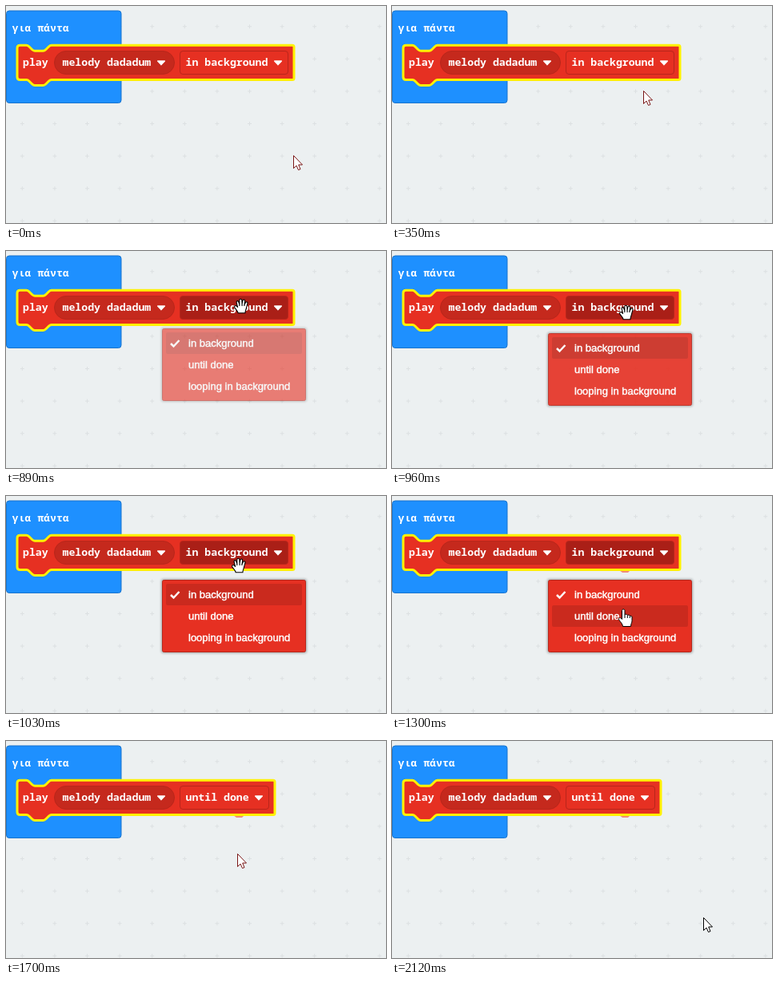
An HTML page that plays this animation: 475 by 272 pixels, repeating every 2390 ms.

```html
<!DOCTYPE html>
<html lang="el">
<head>
<meta charset="utf-8">
<title>Block dropdown</title>
<style>
  html, body { margin: 0; width: 100%; height: 100%; overflow: hidden; background: #ecf0f1; }
  svg { display: block; width: 475px; height: 272px; }
  .code { font: bold 13.2px "Noto Sans Mono", "DejaVu Sans Mono", monospace; fill: #fff; white-space: pre; }
  .menu text { font: 13px "Liberation Sans", Arial, sans-serif; fill: #fff; stroke: #fff; stroke-width: .45px; }
  .shadow { fill: #000; fill-opacity: .3; filter: blur(1.5px); }
  .field { stroke: #b8261b; stroke-width: 1; }
  .caret { fill: #fff; stroke: #fff; stroke-width: 1.5; stroke-linejoin: round; }
  .cursor path { fill: #fff; stroke: #000; stroke-width: 1; stroke-linejoin: round; }
  .cursor .line { fill: none; }
</style>
</head>
<body>
<svg viewBox="0 0 475 272">
  <defs>
    <pattern id="grid" y="5.4" width="40.6" height="40.6" patternUnits="userSpaceOnUse">
      <path d="M17.8 20.3h5M20.3 17.8v5" stroke="#dce0e2"/>
    </pattern>
    <path id="caret" d="M-4.300-2H4.300L0 2.600Z"/>
  </defs>
  <rect width="475" height="272" fill="#ecf0f1"/>
  <rect width="475" height="272" fill="url(#grid)"/>

  <rect x=".5" y="6" width="143.500" height="115.500" rx="3.500" fill="#1e90ff" stroke="#1873cc"/>
  <text class="code" x="7.5" y="32">για πάντα</text>

  <path id="smudge" d="M284 93H298L295 96H288Z" fill="#f08a78"/>
  <path id="block" fill="#e63022" stroke="#fff200" stroke-width="3" stroke-linejoin="round"/>
  <text class="code" x="21" y="75">play</text>
  <rect class="field" x="60.500" y="56.500" width="150" height="29" rx="14.500" fill="#c5291d"/>
  <text class="code" x="70.500" y="75">melody dadadum</text>
  <use href="#caret" class="caret" x="194" y="71"/>
  <rect id="field" class="field" x="217.500" y="56.500" height="29" rx="3.500"/>
  <text id="value" class="code" x="224.500" y="75"></text>
  <use id="arrow" href="#caret" class="caret" y="71"/>

  <g id="menu" class="menu">
    <rect class="shadow" x="194" y="104" width="182" height="93" rx="3"/>
    <rect x="195.500" y="105.500" width="179" height="90" rx="2" fill="#e63022" stroke="#b8261b"/>
    <rect id="row" x="200" width="170" height="27" rx="2" fill="#000" fill-opacity=".12"/>
    <path d="M206 124L209.500 127.500L216.500 120" fill="none" stroke="#fff" stroke-width="2.500"/>
    <text x="228" y="128">in background</text>
    <text x="228" y="155">until done</text>
    <text x="228" y="182">looping in background</text>
  </g>

  <circle id="press" r="12.500" fill="#f7941d" fill-opacity=".93"/>
  <g id="cursor" class="cursor">
    <g data-kind="arrow">
      <path id="tip" d="M.5.5V16.500L4 13L6.500 18.500L9 17.500L6.700 12H11.500Z"/>
    </g>
    <g data-kind="open" transform="scale(1.1)">
      <path d="M-3.500 8C-3.500 6-6.500 3.500-7.500 1.500C-8.200-.5-6-1-4.800.5L-4 1.300L-5.300-4C-5.700-6-3.500-6.500-3-4.700L-2-2V-6.500C-2-8.500.7-8.500.8-6.500L1-2.500L1.700-6C2.200-8 4.500-7.500 4.200-5.500L3.700-1.500L5-4C6-5.500 7.700-4.500 7.200-3L5.500 3.500C5 5 4.500 6 4.500 8Z"/>
      <path class="line" d="M-2-2V0M1-2.500V0M3.700-1.500L3.500 0"/>
    </g>
    <g data-kind="fist">
      <path style="fill:#fff6d8" d="M-3.500 7C-3.500 5-6 3.500-6.500 1.500C-7-.5-5.500-1.500-4.500-.8V-3C-4.500-5.500-2-5.500-1.500-4.300C-1-6 1.300-6 1.800-4.300C2.500-5.500 4.300-5 4.500-3.500C5.500-4.200 6.500-3.500 6.500-2V1.500C6.500 4 5 5 5 7Z"/>
      <path class="line" d="M-1.500-4V-2M1.800-4V-2M4.500-3.300V-1.800"/>
    </g>
    <g data-kind="point">
      <path d="M-2 1.500C-2-.5 1.500-.5 1.500 1.500V7C2 5.800 4.500 6 4.800 7.600C5.500 6.600 7.600 7 7.800 8.600C8.500 7.800 10.500 8.200 10.500 10V14.500C10.500 17 9 18 9 21.500H-1C-1 18.500-4 16-5.500 13.500C-7 11.500-5 9.800-3.500 11L-2 12.500Z"/>
      <path class="line" d="M1.500 7V11M4.800 8V11M7.800 9V11"/>
    </g>
  </g>
</svg>
<script>
const LOOP = 2390;
const $ = id => document.getElementById(id);
const set = (id, attrs) => {
  for (const name in attrs) $(id).setAttribute(name, attrs[name]);
};
const mix = (a, b, p) => a + (b - a) * p;

// Pointer poses: start time, x, y, kind
const poses = [[0, 359, 187, 'arrow']];
for (let k = 1; k <= 8; k++) {
  const p = (1 - Math.cos(Math.PI * k / 8)) / 2;
  const y = mix(187, 70, p);
  poses.push([70 * k, mix(359, 294, p), y, y < 94 ? 'open' : 'arrow']);
}
poses.push(
  [690, 293.5, 71, 'fist'], [820, 294, 69, 'open'], [960, 293, 77, 'open'],
  [1030, 291, 87, 'open'], [1100, 290, 103, 'point'], [1180, 289.5, 111, 'point'],
  [1250, 289.5, 130, 'point'], [1300, 289.5, 142, 'point'], [1700, 289, 141, 'arrow']
);
[[1830, .1], [1900, .36], [1970, .67], [2040, .91], [2120, 1]].forEach(([t, p]) =>
  poses.push([t, mix(289, 389, p), mix(141, 221, p), 'arrow']));

// Menu states: start time, opacity, vertical offset
const fades = [[0, 0, 0], [820, .1, -11], [890, .6, -8], [960, .9, -2], [1030, 1, 0],
  [1630, .4, 0], [1700, 0, 0]];

const at = (list, t) => list.findLast(item => item[0] <= t);

function blockPath(right) {
  return `M14 52.800Q14 49.300 17.500 49.300H25.500c1.700 0 2.600.9 3.500 1.700l3.500 3.500c.9.900 1.700 1.700 3.500 1.700h10.400
    c1.700 0 2.600-.9 3.500-1.700l3.500-3.500c.9-.9 1.700-1.700 3.500-1.700H${right - 2}q2 0 2 2V90.500q0 2-2 2H56.900
    c-1.700 0-2.600.9-3.500 1.700l-3.500 3.500c-.9.900-1.700 1.700-3.500 1.700h-10.400c-1.700 0-2.600-.9-3.500-1.700
    l-3.500-3.500c-.9-.9-1.700-1.700-3.500-1.700H17.500Q14 92.500 14 89Z`;
}

function draw(t) {
  const [, x, y, kind] = at(poses, t);
  const [, opacity, shift] = at(fades, t);
  const done = t >= 1630;
  const open = t >= 820 && !done;
  const trim = done ? 24 : 0;

  set('block', { d: blockPath(360 - trim) });
  set('field', { width: 135 - trim, fill: open ? '#aa1f17' : '#e63022' });
  set('arrow', { x: 340 - trim });
  $('value').textContent = done ? 'until done' : 'in background';
  set('smudge', { visibility: t >= 1100 ? 'visible' : 'hidden' });

  set('menu', { opacity, transform: `translate(0 ${shift})` });
  set('row', { y: t < 1300 ? 110 : 137 });

  const pressed = (t >= 690 && t < 820) || (t >= 1500 && t < 1630);
  set('press', { cx: x, cy: y, visibility: pressed ? 'visible' : 'hidden' });

  set('cursor', { transform: `translate(${Math.round(x * 2) / 2} ${Math.round(y)})` });
  for (const g of $('cursor').children) g.style.display = g.dataset.kind === kind ? '' : 'none';
  $('tip').style.stroke = t < 1830 ? '#7a1616' : '#000';
}

let start;
function tick(now) {
  start ??= now;
  draw((now - start) % LOOP);
  requestAnimationFrame(tick);
}
draw(0);
requestAnimationFrame(tick);
</script>
</body>
</html>
```
